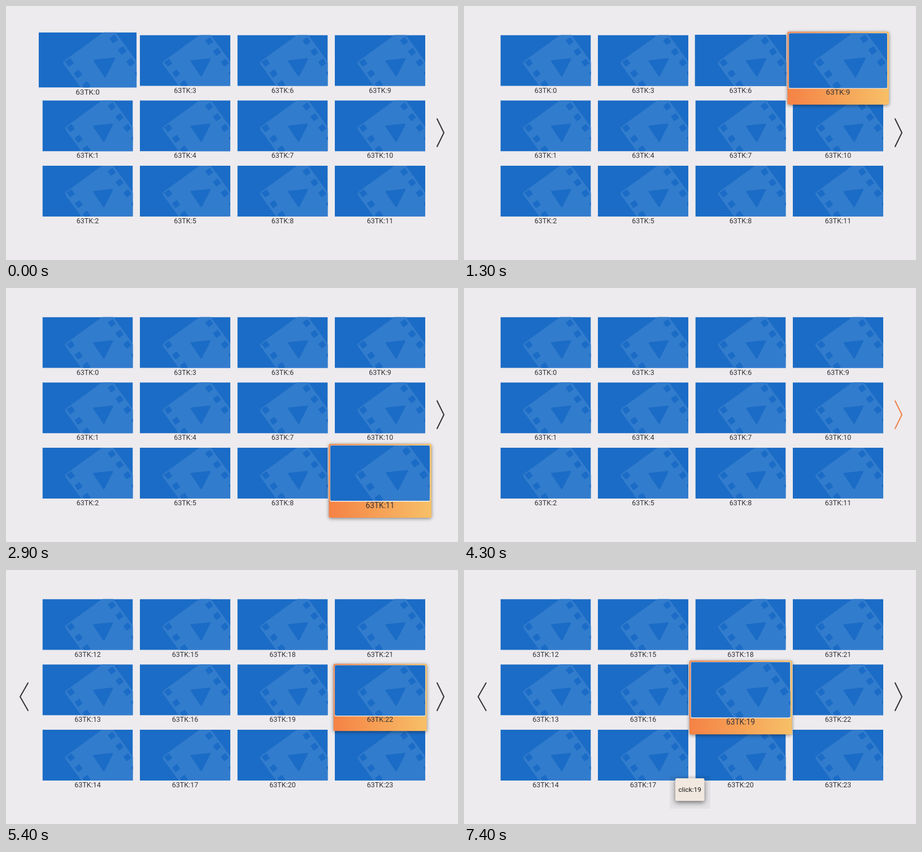
An HTML page with a canvas for the animation above (8 s loop, 800x450 px).

```html
<!DOCTYPE html>
<html lang="en">
<head>
<meta charset="utf-8">
<title>Channel grid</title>
<style>
  html, body { margin: 0; width: 100%; height: 100%; overflow: hidden; background: #edebee; }
  canvas { display: block; }
</style>
</head>
<body>
<canvas id="stage" width="800" height="450"></canvas>
<script>
const ctx = document.getElementById('stage').getContext('2d');
const LOOP = 8000, GROW = 300;
const BLUE = '#1b6cc6', FILM = '#327ccd', INK = '#333237', ORANGE = '#f0824a';

// The screen refreshes only at these times (ms).
const STEPS = [0, 200, 300, 500, 700, 1000, 1100, 1300, 1500, 1700,
  2100, 2200, 2400, 2600, 2900, 3200, 3300, 3500, 3800,
  4200, 4300, 4500, 4700, 4800, 5000, 5400, 5600, 5700,
  6100, 6300, 6500, 6900, 7300, 7400];

// Tile number, focus gained, focus lost
const FOCUS = [[0, -1000, -80], [3, 100, 400], [6, 400, 1070], [9, 1070, 1400],
  [10, 1400, 2060], [11, 2060, 3150], [22, 5400, 6050], [19, 6050, Infinity]];
const ARROW_ON = 3150, ARROW_OFF = 5400, SLIDE = 4450, SLIDE_TIME = 500;

const clamp = x => Math.max(0, Math.min(1, x));
const ease = x => (1 - Math.cos(Math.PI * clamp(x))) / 2;

function focusOf(tile, t) {
  const f = FOCUS.find(f => f[0] === tile);
  if (!f || t < f[1]) return { level: 0, framed: false };
  const framed = t < f[2];
  return { level: framed ? ease((t - f[1]) / GROW) : 1 - ease((t - f[2]) / GROW), framed };
}

function roundBox(x, y, w, h, r, fill) {
  ctx.beginPath();
  ctx.roundRect(x, y, w, h, r);
  ctx.fillStyle = fill;
  ctx.fill();
}

function shadow(color, blur, dy) {
  ctx.shadowColor = color;
  ctx.shadowBlur = blur;
  ctx.shadowOffsetY = dy;
}

function label(text, x, y, size, color) {
  ctx.font = size + 'px Roboto, sans-serif';
  ctx.textAlign = 'center';
  ctx.fillStyle = color;
  ctx.fillText(text, x, y);
}

function poster(top, bottom, radius) {
  ctx.save();
  ctx.beginPath();
  ctx.roundRect(0, top, 160, bottom - top, radius);
  ctx.clip();
  ctx.fillStyle = BLUE;
  ctx.fillRect(0, 0, 160, 92);

  // Film strip, in axes along and across the strip
  ctx.save();
  ctx.translate(50, 49);
  ctx.rotate(-36 * Math.PI / 180);
  ctx.fillStyle = FILM;
  ctx.fillRect(-5, -7, 95, 130);
  ctx.fillRect(-9, -4, 5, 130);
  ctx.fillRect(-8, -7, 2, 4);
  for (let k = -1; k < 5; k++) {
    if (k >= 0) roundBox(-5, 23.5 * k - 5, 10.5, 10.5, 1, BLUE);
    roundBox(76, 11.5 + 23.5 * k - 5, 10.5, 10.5, 1, BLUE);
  }
  ctx.restore();

  // Play mark
  ctx.beginPath();
  ctx.moveTo(91, 46);
  ctx.lineTo(123.5, 42.5);
  ctx.lineTo(108.5, 72);
  ctx.closePath();
  ctx.lineJoin = 'round';
  ctx.lineWidth = 3;
  ctx.fillStyle = ctx.strokeStyle = BLUE;
  ctx.fill();
  ctx.stroke();
  ctx.restore();
}

function frame() {
  const fill = ctx.createLinearGradient(-2, 0, 163, 0);
  fill.addColorStop(0, '#f58245');
  fill.addColorStop(1, '#f7c067');
  ctx.save();
  shadow('rgba(0,0,0,.45)', 6, 1.5);
  roundBox(-2.3, -1, 165, 119, 2.5, fill);
  ctx.restore();
  roundBox(-0.4, 1.2, 160.8, 90.7, 2, '#fdf3ea');
}

function tile(n, t, shift) {
  const { level, framed } = focusOf(n, t);
  const slot = n % 12, scale = 1 + 0.1 * level;
  ctx.save();
  ctx.translate(64.5 + 172.5 * Math.floor(slot / 3) + shift + 80, 51.5 + 115.75 * (slot % 3) + 57);
  ctx.scale(scale, scale);
  ctx.translate(-80, -57);
  if (framed) frame();
  poster(framed ? 1.5 : 0, framed ? 90.7 : 90, framed ? 2 : 0);
  label('63TK:' + n, 80, 102, 12.5, INK);
  ctx.restore();
}

function page(first, t, shift) {
  const order = Array.from({ length: 12 }, (_, i) => first + i);
  const rank = n => { const f = focusOf(n, t); return f.level + (f.framed ? 2 : 0); };
  order.sort((a, b) => rank(a) - rank(b));
  order.forEach(n => tile(n, t, shift));
}

function arrow(x, tip, color) {
  ctx.beginPath();
  ctx.moveTo(x, 200);
  ctx.lineTo(tip, 224.5);
  ctx.lineTo(x, 249);
  ctx.strokeStyle = color;
  ctx.lineWidth = 2;
  ctx.lineCap = ctx.lineJoin = 'round';
  ctx.stroke();
}

function toast(alpha) {
  ctx.save();
  ctx.globalAlpha = alpha;
  ctx.fillStyle = 'rgba(0,0,0,.04)';
  ctx.fillRect(364, 365, 72, 58);
  ctx.save();
  shadow('rgba(0,0,0,.5)', 9, 3);
  roundBox(374, 369, 51.5, 40, 2.5, '#f1e8df');
  ctx.restore();
  label('click:19', 399.7, 393, 11.8, '#111');
  ctx.restore();
}

function draw(t) {
  ctx.fillStyle = '#edebee';
  ctx.fillRect(0, 0, 800, 450);
  const slide = 1 - (1 - clamp((t - SLIDE) / SLIDE_TIME)) ** 5;
  if (slide < 1) page(0, t, -800 * slide);
  if (slide > 0) page(12, t, 800 * (1 - slide));
  if (slide > 0) arrow(39, 25, INK);
  arrow(763, 775, t >= ARROW_ON && t < ARROW_OFF ? ORANGE : INK);
  if (t >= 7300) toast(t < 7400 ? 0.5 : 1);
}

const start = performance.now();
function tick() {
  const now = Math.max(0, performance.now() - start) % LOOP;
  draw(STEPS.findLast(s => s <= now));
  requestAnimationFrame(tick);
}
tick();
</script>
</body>
</html>
```
